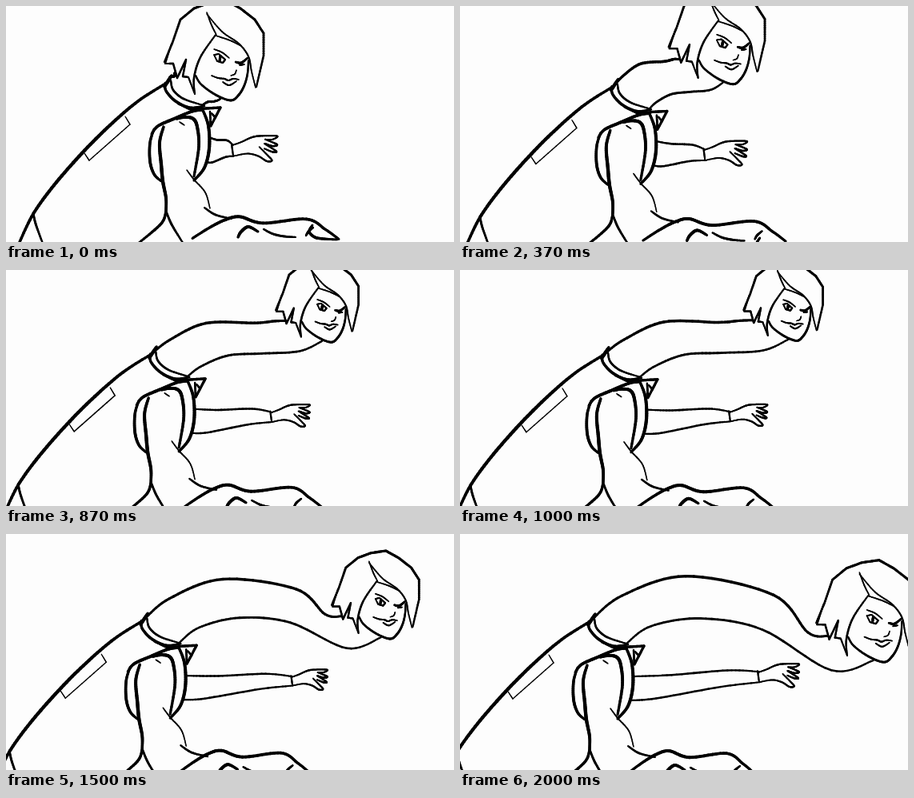
An HTML page with a canvas for the animation above (2370 ms loop, 560 px wide and 295 px high).

```html
<!DOCTYPE html>
<html lang="en">
<head>
<meta charset="utf-8">
<title>Stretching neck</title>
<style>
html, body { margin: 0; width: 100%; height: 100%; overflow: hidden; background: #fdfdfd; }
canvas { display: block; width: 560px; height: 295px; }
</style>
</head>
<body>
<canvas id="stage" width="560" height="295"></canvas>
<script>
const ctx = document.getElementById('stage').getContext('2d');
const LOOP = 2370, LAST = 16;

// Each stroke: brush width, then its points as x, y pairs.
const body = {
  curves: [
    [4.2, 7,301, 24,266, 50,230, 85,190, 120,155, 155,125, 191,102],
    [2.8, 24,264, 27,278, 36,303],
    [3.4, 189,102, 190,112, 202,125, 220,133, 238,131],
    [2.6, 196,99, 199,111, 212,122, 236,130],
    [4.2, 188,107, 197,93],
    [3.8, 172,166, 180,156, 200,147, 222,138, 236,136],
    [3.6, 175,160, 170,177, 170,200, 175,216, 184,225],
    [4.2, 187,157, 182,177, 184,204, 186,225, 190,246, 190,262],
    [3.4, 190,262, 184,278, 155,303],
    [2.8, 190,262, 197,279, 211,302],
    [4, 203,147, 214,145, 224,147, 229,157, 231,182, 225,219],
    [4, 236,136, 243,156, 244,184, 238,208, 225,224],
    [1.6, 207,151, 213,155],
    [1.8, 216,211, 225,223, 239,239, 245,259],
    [2.6, 238,258, 252,267, 272,272]
  ],
  lines: [
    [1.4, 139,144, 145,154, 94,199, 88,190],
    [3.2, 205,128, 222,136, 240,134, 258,133, 246,156, 245,138],
    [2.4, 247,140, 252,146]
  ]
};
const head = {
  curves: [
    [2.5, 236,110, 235,90, 243,64, 262,36],
    [1.8, 251,8, 257,24, 263,36],
    [2, 251,10, 270,32, 291,47, 303,63, 307,82, 312,102],
    [1.8, 262,37, 280,43, 294,50],
    [2.8, 237,87, 244,98, 262,111, 281,118, 291,111, 298,99, 302,84, 303,68],
    [1.8, 260,54, 270,58, 279,65],
    [3.2, 268,62, 267,69],
    [3, 287,70, 294,71, 302,65],
    [2, 292,74, 298,73],
    [1.5, 288,80, 286,85, 281,87],
    [2, 257,87, 265,90, 273,91, 278,93, 284,91, 291,92],
    [2, 271,95, 279,99, 288,94]
  ],
  lines: [
    [3, 198,70, 208,46, 218,17, 235,3, 254,-4, 275,-7, 293,3, 311,17, 322,34, 322,62, 313,101],
    [2.4, 207,47, 199,72, 209,72, 214,90, 225,67, 221,88, 228,89, 236,110],
    [2, 260,61, 266,60, 274,67, 271,71, 264,69, 260,61]
  ]
};
const hand = {
  curves: [
    [2.2, 303,178, 305,193],
    [2.2, 304,180, 315,176, 326,171, 336,169, 357,169, 352,173, 343,173],
    [2.4, 343,173, 357,179, 352,181, 343,178],
    [2.4, 342,178, 356,187, 352,188, 342,184],
    [2.2, 336,182, 345,191, 351,198, 345,199, 335,193, 322,190, 305,193]
  ]
};
const forearm = { curves: [[3.8, 233,294, 253,281, 272,271, 290,267, 318,275, 370,270, 393,283, 409,295]] };
const knuckles = {
  curves: [
    [3.8, 284,295, 288,288, 297,282, 309,288],
    [2.8, 316,285, 328,291, 342,294, 356,295],
    [2.8, 369,293, 372,288, 378,283]
  ]
};
const thumb = { curves: [[3.4, 383,274, 379,282, 386,289, 397,291, 414,292]] };

const mix = (a, b, u) => a + (b - a) * u;

// Values that turn at a few key poses, evenly mixed between them.
const TURNS = [0, 3, 8, 12, LAST];
function keyed(pose, ...values) {
  const k = Math.max(1, TURNS.findIndex(turn => turn >= pose));
  return mix(values[k - 1], values[k], (pose - TURNS[k - 1]) / (TURNS[k] - TURNS[k - 1]));
}

function spline(a, b, c, d, u) {
  return b + u / 2 * (c - a + u * (2 * a - 5 * b + 4 * c - d + u * (3 * (b - c) + d - a)));
}

// A brush line through [x, y] points that swells towards its middle.
function ink(width, points, sharp) {
  const end = points.length - 1, steps = 10, total = end * steps;
  const at = i => points[Math.max(0, Math.min(end, i))];
  let last = points[0];
  for (let n = 1; n <= total; n++) {
    const i = Math.floor((n - 1) / steps), u = n / steps - i;
    const next = [0, 1].map(axis => sharp
      ? mix(at(i)[axis], at(i + 1)[axis], u)
      : spline(at(i - 1)[axis], at(i)[axis], at(i + 1)[axis], at(i + 2)[axis], u));
    ctx.lineWidth = width * (0.78 + 0.25 * Math.sin(Math.PI * n / total));
    ctx.beginPath();
    ctx.moveTo(...last);
    ctx.lineTo(...next);
    ctx.stroke();
    last = next;
  }
}

function drawPart({ curves = [], lines = [] }, place) {
  const trace = sharp => ([width, ...flat]) => {
    const points = [];
    for (let i = 0; i < flat.length; i += 2) points.push(place(flat[i], flat[i + 1]));
    ink(width, points, sharp);
  };
  curves.forEach(trace(false));
  lines.forEach(trace(true));
}

// A line from one point to another, raised above the chord by [fraction, lift] pairs.
function drawArch(width, from, to, lifts) {
  const bends = lifts.map(([u, lift]) => [mix(from[0], to[0], u), mix(from[1], to[1], u) - lift]);
  ink(width, [from, ...bends, to]);
}

function draw(pose) {
  const p = pose / LAST;
  const reach = p * (1.4 - 0.4 * p);
  const dx = 10 - 38 * p ** 0.85;
  const dy = 7 - 13 * (1 - p) ** 2;

  const headX = 236 + 248 * reach;
  const headY = keyed(pose, 110, 90, 82, 124, 152);
  const headScale = keyed(pose, 1, 0.97, 0.8, 0.88, 1.02);
  const handX = 283 + 90 * reach;
  const handY = keyed(pose, 173, 179, 177, 178, 172);
  const handScale = keyed(pose, 1.05, 1, 0.88, 0.83, 0.95);
  const arch = keyed(pose, 3, 14, 23, 49, 63);
  const crest = keyed(pose, 0, 5, 7, 35, 47);

  const onBody = (x, y) => [x + dx, y + dy];
  const onHead = (x, y) => [headX + (x - 236) * headScale, headY + (y - 110) * headScale];
  const onHand = (x, y) => [handX + (x - 304) * handScale, handY + (y - 179) * handScale];
  const onForearm = (x, y) => [x + mix(-22 * p, 7 - 48 * p, (x - 233) / 176), y + dy * 0.6];

  ctx.fillStyle = '#fdfdfd';
  ctx.fillRect(0, 0, 560, 295);
  ctx.strokeStyle = '#000';
  ctx.lineCap = ctx.lineJoin = 'round';

  drawArch(3.4, onBody(192, 101), onHead(212, 86),
    [[0.13, arch * 0.53], [0.4, arch], [0.77, crest], [0.916, 3]]);
  drawArch(2.8, onBody(236, 130), onHead(268, 116),
    [[0.1, arch * 0.38], [0.3, arch * 0.6], [0.55, crest * 0.62], [0.83, -arch * 0.25]]);
  drawArch(2.5, onBody(246, 171), onHand(304, 179), [[0.3, 0], [0.75, 3]]);
  drawArch(2.5, onBody(241, 201), onHand(305, 193), [[0.2, -2], [0.7, 1]]);
  drawPart(hand, onHand);
  drawPart(body, onBody);
  drawPart(forearm, onForearm);
  drawPart(knuckles, (x, y) => [x + 6 - 34 * p, y + dy]);
  drawPart(thumb, (x, y) => [x - 44 * p, y + 85 * p]);
  drawPart(head, onHead);
}

// Eight poses a second, starting on whole hundredths.
function poseAt(time) {
  let pose = LAST;
  while (Math.floor(pose * 12.5) * 10 > time) pose--;
  return pose;
}

const start = performance.now();
let shown = -1;
function tick() {
  const pose = poseAt((performance.now() - start) % LOOP);
  if (pose !== shown) draw(shown = pose);
  requestAnimationFrame(tick);
}
tick();
</script>
</body>
</html>
```
